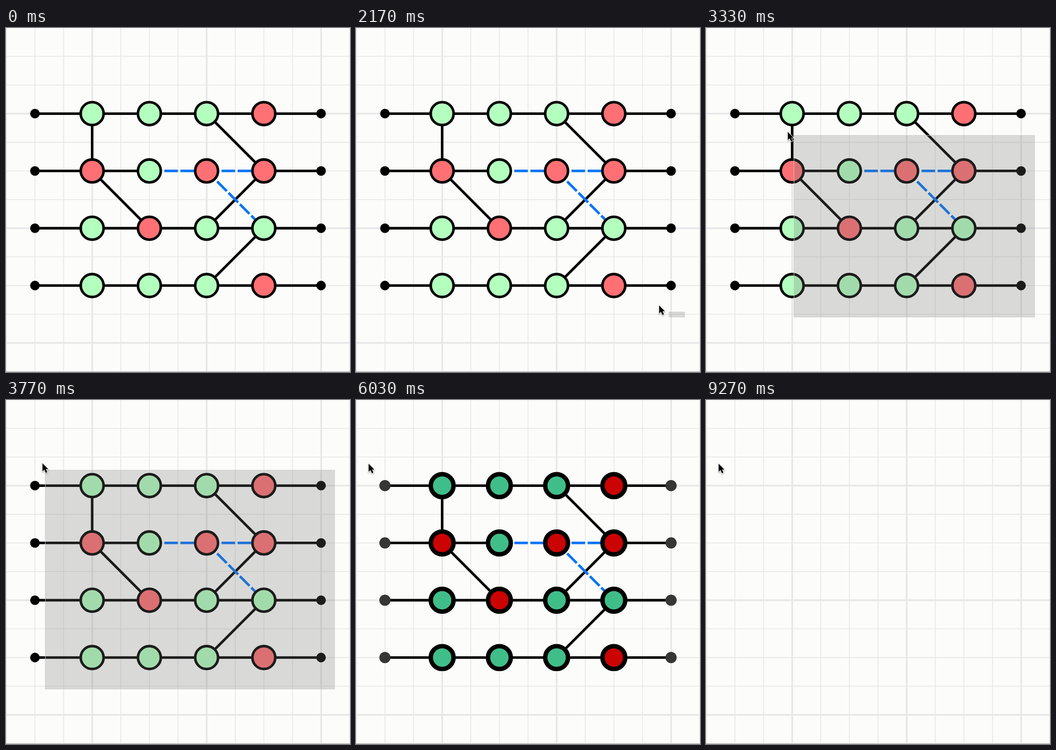
Recreate the animation shown at these times as an HTML page with a canvas. Size 749 by 748 pixels, loop 9.37 s.

```html
<!DOCTYPE html>
<html lang="en">
<head>
<meta charset="utf-8">
<title>Graph selection</title>
<style>
html, body { margin: 0; width: 100%; height: 100%; overflow: hidden; background: #fcfcfa; }
canvas { display: block; }
</style>
</head>
<body>
<canvas id="stage" width="749" height="748"></canvas>
<script>
const ctx = document.getElementById('stage').getContext('2d');
const LOOP = 9370, LAG = 45;
const DRAG = 2000, RELEASE = 6030, DELETE = 7070, UNDO = 8030, REDO = 9070;
const STEP = 124.6, X0 = 63, Y0 = 186.2;
const RED = ['4,0', '1,1', '3,1', '4,1', '2,2', '4,3'];

// Edges as column,row to column,row
const SOLID = [
  [0, 0, 5, 0], [0, 1, 2, 1], [4, 1, 5, 1], [0, 2, 5, 2], [0, 3, 5, 3],
  [1, 0, 1, 1], [1, 1, 2, 2], [3, 0, 4, 1], [4, 1, 3, 2], [4, 2, 3, 3]
];
const DASHED = [[2, 1, 3, 1], [3, 1, 4, 1], [3, 1, 4, 2]];

// Pointer path: time, x, y
const PATH = [
  [350, 762, 700], [1200, 716, 629], [2000, 716, 629], [2125, 681, 617],
  [2170, 660, 603], [2825, 347, 342], [2870, 326, 318], [3725, 85, 152],
  [3770, 79, 137], [4555, 39, 130], [4600, 37, 129], [5100, 27, 138]
];
const ARROW = new Path2D('M0.5 0.5V18L4.6 14.4L7.6 21.3L10.9 19.9L8 13.2H13Z');

const px = col => X0 + STEP * col;
const py = row => Y0 + STEP * row;

const slope = (i, k) => PATH[i] && PATH[i + 1]
  ? (PATH[i + 1][k] - PATH[i][k]) / (PATH[i + 1][0] - PATH[i][0]) : 0;

// Harmonic mean keeps the curve from overshooting
function tangent(i, k) {
  const a = slope(i - 1, k), b = slope(i, k);
  return a * b > 0 ? 2 * a * b / (a + b) : 0;
}

function pointer(t) {
  const last = PATH.length - 1;
  if (t >= PATH[last][0]) return PATH[last].slice(1);
  if (t <= PATH[0][0]) return PATH[0].slice(1);
  const i = PATH.findIndex(p => p[0] > t) - 1;
  const span = PATH[i + 1][0] - PATH[i][0], u = (t - PATH[i][0]) / span;
  const ease = u * u * (3 - 2 * u);
  return [1, 2].map(k =>
    PATH[i][k] * (1 - ease) + PATH[i + 1][k] * ease +
    span * u * (1 - u) * ((1 - u) * tangent(i, k) - u * tangent(i + 1, k)));
}

function line(x1, y1, x2, y2) {
  ctx.beginPath();
  ctx.moveTo(x1, y1);
  ctx.lineTo(x2, y2);
  ctx.stroke();
}

function disc(x, y, r, fill, border) {
  ctx.beginPath();
  ctx.arc(x, y, r, 0, 2 * Math.PI);
  ctx.fillStyle = fill;
  ctx.fill();
  if (border) {
    ctx.lineWidth = border;
    ctx.stroke();
  }
}

function drawGrid() {
  ctx.fillStyle = '#fcfcfa';
  ctx.fillRect(0, 0, 749, 748);
  for (const major of [false, true]) {
    ctx.strokeStyle = major ? '#e7e7e9' : '#e8e8e7';
    ctx.lineWidth = major ? 3.6 : 1.8;
    for (let i = 0; i <= 12; i++) {
      const x = 0.8 + i * 62.3, y = -0.7 + i * 62.3;
      if ((i % 4 === 3) === major) {
        line(x, 0, x, 748);
        line(0, y, 749, y);
      }
    }
  }
  ctx.fillStyle = '#a2a2a2';
  ctx.fillRect(0, 747, 749, 1);
}

function drawEdges(edges, color) {
  ctx.strokeStyle = color;
  ctx.lineWidth = 5.6;
  for (const [a, b, c, d] of edges) line(px(a), py(b), px(c), py(d));
}

function drawGraph(selected) {
  drawEdges(SOLID, '#000');
  ctx.setLineDash([29.5, 5.5]);
  ctx.lineDashOffset = 2.5;
  drawEdges(DASHED, '#0474f9');
  ctx.setLineDash([]);
  ctx.strokeStyle = '#000';
  const [green, red] = selected ? ['#40be89', '#cb0303'] : ['#b3ffbe', '#ff7074'];
  for (let row = 0; row < 4; row++) {
    for (let col = 0; col < 6; col++) {
      const x = px(col), y = py(row);
      if (col % 5 === 0) disc(x, y, selected ? 12.2 : 10.4, selected ? '#363636' : '#000');
      else disc(x, y, selected ? 24.8 : 24.9, RED.includes(col + ',' + row) ? red : green, selected ? 9.6 : 5.6);
    }
  }
}

function drawBand(t) {
  const [x, y] = pointer(Math.max(DRAG, t - LAG)).map(Math.round);
  const w = 716 - x, h = 629 - y;
  if (w < 1 || h < 1) return;
  ctx.fillStyle = 'rgba(112,112,112,.25)';
  ctx.fillRect(x, y, w, h);
  ctx.strokeStyle = '#cbcbc9';
  ctx.lineWidth = 1;
  ctx.strokeRect(x + 0.5, y + 0.5, w - 1, h - 1);
}

function drawPointer(t) {
  if (t < PATH[0][0]) return;
  ctx.save();
  ctx.translate(...pointer(t));
  ctx.shadowColor = 'rgba(0,0,0,.4)';
  ctx.shadowBlur = 3;
  ctx.shadowOffsetY = 1.5;
  ctx.strokeStyle = '#fff';
  ctx.lineWidth = 2;
  ctx.stroke(ARROW);
  ctx.shadowColor = 'transparent';
  ctx.fillStyle = '#000';
  ctx.fill(ARROW);
  ctx.restore();
}

function frame() {
  const t = performance.now() % LOOP;
  const present = t < DELETE || (t >= UNDO && t < REDO);
  drawGrid();
  if (present) drawGraph(t >= RELEASE && t < DELETE);
  if (t > DRAG && t < RELEASE) drawBand(t);
  drawPointer(t);
  requestAnimationFrame(frame);
}
frame();
</script>
</body>
</html>
```
